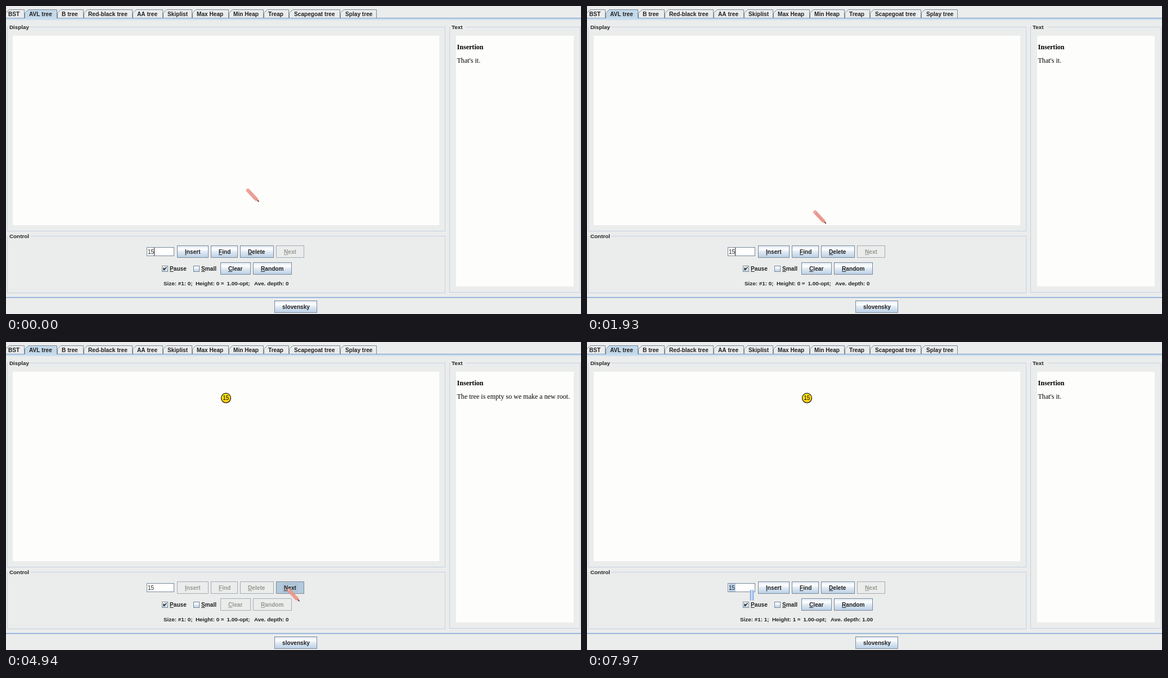
Write an HTML page with a canvas that moves like this. It is 1022 by 548 pixels and loops after 8000 ms.

```html
<!DOCTYPE html>
<html lang="en">
<head>
<meta charset="utf-8">
<title>AVL tree insertion</title>
<style>
html, body { margin: 0; width: 100%; height: 100%; overflow: hidden; background: #ebecec; }
canvas { display: block; }
</style>
</head>
<body>
<canvas id="stage" width="1022" height="548"></canvas>
<script>
const ctx = document.getElementById('stage').getContext('2d');
const LOOP = 8000;
const SANS = '"Liberation Sans", Arial, sans-serif';
const SERIF = '"Liberation Serif", "Times New Roman", serif';
const UI = `bold 10.15px ${SANS}`;
const SMALL_UI = `bold 9.85px ${SANS}`;
const BG = '#ebecec', PAPER = '#fdfdfc', BORDER = '#7a8a99', BLUE = '#b8cfe5';
const PRESSED = '#b3cadb', INK = '#222';

// Moments at which the interface changes state
const INSERT_DOWN = 3480, INSERT_UP = 3590, NODE_IN = 4100, NODE_SET = 4550;
const NEXT_DOWN = 4890, NEXT_UP = 5020, FIELD_CLICK = 7280, FIELD_SELECT = 7560;

// Pointer hot spot: [time, x, y]
const PATH = [
  [0, 427, 325], [1130, 416, 318], [1630, 416, 318], [2430, 373, 462],
  [2700, 366, 470], [3320, 348, 438], [3900, 350, 438], [4130, 351, 438],
  [4800, 499, 438], [5770, 500, 438], [6060, 425, 448], [6400, 297, 444],
  [6540, 293, 444], [7300, 293, 442], [7970, 293, 441]
];

const TABS = [
  ['BST', 4, -1], ['AVL tree', 41, 33], ['B tree', 99, 91], ['Red-black tree', 146, 138],
  ['AA tree', 233, 225], ['Skiplist', 287, 279], ['Max Heap', 339, 331],
  ['Min Heap', 404, 396], ['Treap', 466, 458], ['Scapegoat tree', 512, 503],
  ['Splay tree', 603, 594]
];
const TABS_END = 659;

// label, left, top, right, text x
const BUTTONS = [
  ['Insert', 304, 426, 360, 318], ['Find', 364, 426, 412, 378],
  ['Delete', 416, 426, 476, 430], ['Next', 480, 426, 530, 494],
  ['Clear', 381, 456, 435, 395], ['Random', 439, 456, 508, 453]
];

function fill(x, y, w, h, color) {
  ctx.fillStyle = color;
  ctx.fillRect(x, y, w, h);
}

function frame(x, y, w, h, color) {
  ctx.strokeStyle = color;
  ctx.lineWidth = 1;
  ctx.strokeRect(x + .5, y + .5, w - 1, h - 1);
}

function label(str, x, y, font = UI, color = INK) {
  ctx.font = font;
  ctx.fillStyle = color;
  ctx.fillText(str, x, y);
}

function mnemonic(str, x, y, color = INK) {
  label(str, x, y, UI, color);
  fill(x, y + 1, ctx.measureText(str[0]).width, 1, color);
}

function line(x1, y1, x2, y2, color, width) {
  ctx.strokeStyle = color;
  ctx.lineWidth = width;
  ctx.beginPath();
  ctx.moveTo(x1, y1);
  ctx.lineTo(x2, y2);
  ctx.stroke();
}

function glossy(x, y, w, h) {
  const g = ctx.createLinearGradient(0, y, 0, y + h);
  g.addColorStop(0, '#dde8f3');
  g.addColorStop(.3, '#fdfeff');
  g.addColorStop(.55, '#dde8f3');
  g.addColorStop(1, BLUE);
  fill(x, y, w, h, g);
}

function pointerAt(t) {
  const i = PATH.findIndex(p => p[0] > t);
  if (i < 0) return PATH[PATH.length - 1].slice(1);
  const [t0, x0, y0] = PATH[i - 1], [t1, x1, y1] = PATH[i];
  const u = (t - t0) / (t1 - t0), e = u * u * (3 - 2 * u);
  return [x0 + (x1 - x0) * e, y0 + (y1 - y0) * e];
}

function drawTabs() {
  ctx.lineWidth = 1;
  TABS.forEach(([name, textX, x], i) => {
    const right = (i + 1 < TABS.length ? TABS[i + 1][2] : TABS_END) - .5;
    const left = x + .5, selected = i === 1;
    ctx.beginPath();
    ctx.moveTo(left, 22);
    ctx.lineTo(left, 12.5);
    ctx.lineTo(left + 6, 6.5);
    ctx.lineTo(right, 6.5);
    ctx.lineTo(right, 22);
    ctx.fillStyle = selected ? '#c3d9ea' : BG;
    ctx.fill();
    ctx.strokeStyle = BORDER;
    ctx.stroke();
    label(name, textX, 18);
  });
  fill(0, 21, 1022, 1, '#7b9bc3');
  fill(0, 22, 1022, 3, '#cbdeef');
  fill(34, 21, 56, 1, '#c3d9ea');
}

function panel(title, x, y, w, h, titleWidth) {
  frame(x, y, w, h, '#c3d2e0');
  fill(x + 2, y, titleWidth, 1, BG);
  label(title, x + 4, y + 3.5, SMALL_UI);
}

function button([name, x, y, right, textX], { enabled, pressed, hover, focus }) {
  const w = right - x, h = 22;
  if (pressed) fill(x, y, w, h, PRESSED);
  else if (enabled) glossy(x, y, w, h);
  if (enabled && hover && !pressed) frame(x + 1, y + 1, w - 2, h - 2, BLUE);
  frame(x, y, w, h, enabled ? BORDER : '#a5adb4');
  mnemonic(name, textX, y + 15, enabled ? INK : '#999991');
  if (focus) frame(textX - 2, y + 4, right - textX - 10, 15, '#a3b8cc');
}

function checkbox(name, x, checked, hover) {
  glossy(x, 462, 11, 11);
  if (hover) frame(x + 1, 463, 9, 9, '#9fbcdc');
  frame(x, 462, 11, 11, BORDER);
  if (checked) {
    line(x + 3.5, 465.5, x + 3.5, 470, INK, 2);
    line(x + 3.5, 470, x + 8.5, 464.5, INK, 1.5);
  }
  mnemonic(name, x + 14, 471);
}

function drawField(t) {
  const editing = t < INSERT_DOWN || t >= FIELD_CLICK;
  const selected = t >= FIELD_SELECT;
  fill(250, 429, 49, 16, '#fff');
  frame(250, 429, 49, 16, BORDER);
  if (selected) fill(252, 430, 12, 14, BLUE);
  label('15', 252, 441, `10px ${SANS}`);
  const blink = t >= FIELD_CLICK || Math.floor((t + 70) / 500) % 2 === 0;
  if (editing && !selected && blink) fill(263, 430, 1, 14, INK);
}

function drawStatus(done) {
  const n = done ? 1 : 0, dx = done ? -8 : 0;
  const put = (str, x) => label(str, x + dx, 497, SMALL_UI);
  put(`Size: #1: ${n};`, 280);
  put(`Height: ${n} =`, 337);
  put('1.00-opt;', 392.5);
  put(`Ave. depth: ${done ? '1.00' : '0'}`, 441);
}

function drawNode(t) {
  if (t < NODE_IN) return;
  const u = Math.min(1, (t - NODE_IN) / (NODE_SET - NODE_IN));
  const x = 391, y = 40 + 59.7 * u;
  ctx.save();
  ctx.beginPath();
  ctx.rect(12, 53, 758, 337);
  ctx.clip();
  const g = ctx.createLinearGradient(x - 5, y - 9, x + 5, y + 9);
  g.addColorStop(0, '#fff018');
  g.addColorStop(1, '#fbc60e');
  ctx.beginPath();
  ctx.arc(x, y, 8.5, 0, Math.PI * 2);
  ctx.fillStyle = g;
  ctx.fill();
  ctx.strokeStyle = '#111';
  ctx.lineWidth = 1.2;
  ctx.stroke();
  label('15', x - 5.7, y + 3.7, `10px ${SANS}`, '#000');
  ctx.restore();
}

function drawPencil(x, y) {
  ctx.save();
  ctx.translate(x, y);
  ctx.lineCap = 'round';
  line(3, 3, 18, 19, 'rgba(242,140,128,.25)', 8);
  line(3, 3, 17, 18, '#df7466', 5);
  line(3, 3, 17, 18, '#f6cbc3', 3);
  line(4, 4, 17, 18, '#d86a5c', 1.1);
  ctx.fillStyle = '#e2937f';
  ctx.beginPath();
  ctx.moveTo(15.5, 20);
  ctx.lineTo(19.5, 16.5);
  ctx.lineTo(22.5, 23);
  ctx.fill();
  line(20.5, 21, 22, 22.8, '#4a302c', 1.6);
  ctx.restore();
}

function drawTextCursor(x, y) {
  fill(x - 4, y + 1, 8, 18, 'rgba(140,175,235,.3)');
  fill(x - 3, y, 2, 19, '#8eb0e8');
  fill(x - 1, y, 2, 19, '#dce8fb');
  fill(x + 1, y, 2, 19, '#8eb0e8');
}

function draw(t) {
  const [px, py] = pointerAt(t);
  const over = (x, y, right, bottom) => px >= x && px < right && py >= y && py < bottom;
  const busy = t >= INSERT_UP && t < NEXT_UP;
  const done = t >= NEXT_UP;

  fill(0, 0, 1022, 548, BG);
  drawTabs();
  panel('Display', 2, 37, 779, 364, 40);
  panel('Control', 2, 409, 779, 102, 40);
  panel('Text', 788, 37, 233, 473, 28);
  fill(12, 53, 758, 337, PAPER);
  fill(800, 53, 209, 446, PAPER);
  label('Insertion', 801.5, 77, `bold 12.1px ${SERIF}`, '#000');
  label(busy ? 'The tree is empty so we make a new root.' : "That's it.",
    801.5, 101, `12.05px ${SERIF}`, '#000');

  drawNode(t);
  drawField(t);
  for (const b of BUTTONS) {
    const [name, x, y, right] = b, isNext = name === 'Next';
    button(b, {
      enabled: isNext === busy,
      pressed: isNext ? t >= NEXT_DOWN && t < NEXT_UP
        : name === 'Insert' && t >= INSERT_DOWN && t < INSERT_UP,
      hover: over(x, y, right, y + 22),
      focus: isNext ? t >= NEXT_DOWN && t < FIELD_CLICK
        : name === 'Insert' && t >= INSERT_DOWN && t < NEXT_DOWN
    });
  }
  checkbox('Pause', 277, true, over(277, 457, 323, 479));
  checkbox('Small', 333, false, over(333, 457, 375, 479));
  drawStatus(done);

  fill(0, 517, 1022, 1, '#d3e2f0');
  fill(0, 518, 1022, 1, '#7fa3cf');
  fill(0, 519, 1022, 1, '#c8d8e8');
  glossy(477, 524, 76, 22);
  frame(477, 524, 76, 22, BORDER);
  label('slovensky', 491, 539);

  if (px < 299 && py < 446) drawTextCursor(Math.round(px), Math.round(py));
  else drawPencil(px, py);
}

function tick() {
  draw(performance.now() % LOOP);
  requestAnimationFrame(tick);
}
tick();
</script>
</body>
</html>
```
